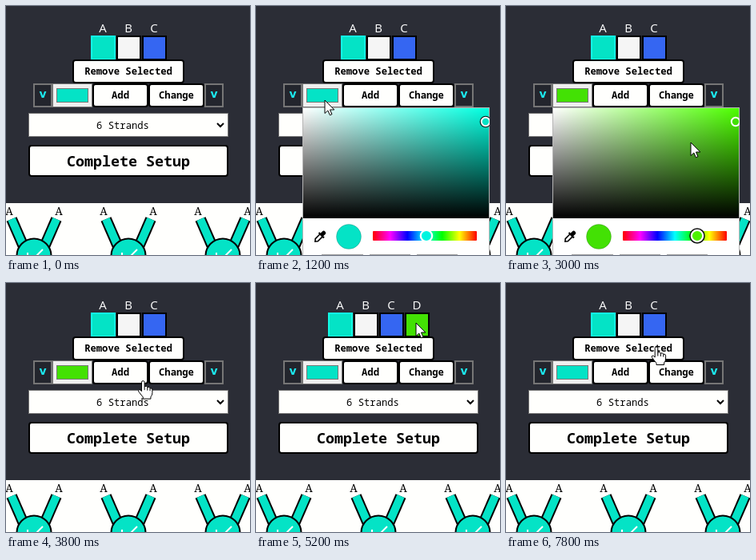
Animation of 305x312 px, one loop 8000 ms. Source, as an HTML page:

```html
<!DOCTYPE html>
<html lang="en">
<head>
<meta charset="utf-8">
<title>Strand colour setup</title>
<style>
html, body { margin: 0; width: 100%; height: 100%; overflow: hidden; background: #2b2d36; }
svg { display: block; width: 100%; height: 100%; }
text { text-anchor: middle; }
.label { font: 15px "Open Sans", "Noto Sans", sans-serif; fill: #fff; }
.mono { font: 600 12.2px "Noto Sans Mono", "DejaVu Sans Mono", monospace; }
.plain { font-weight: 400; }
.big { font-size: 18.35px; }
.vee { font: bold 14px "DejaVu Sans", sans-serif; fill: #1ce8ee; }
.serif { font: 13.5px "Noto Serif", "Liberation Serif", serif; }
.button { fill: #fffffd; stroke: #000; stroke-width: 2; }
.arrow { fill: none; stroke: #fff; stroke-width: 2; }
</style>
</head>
<body>
<svg id="stage" viewBox="0 0 305 312">
  <defs>
    <linearGradient id="white"><stop stop-color="#fff"/><stop offset="1" stop-color="#fff" stop-opacity="0"/></linearGradient>
    <linearGradient id="black" x2="0" y2="1"><stop stop-opacity="0"/><stop offset="1"/></linearGradient>
    <linearGradient id="hues">
      <stop stop-color="#f00"/><stop offset=".1667" stop-color="#f0f"/><stop offset=".3333" stop-color="#00f"/>
      <stop offset=".5" stop-color="#0ff"/><stop offset=".6667" stop-color="#0f0"/>
      <stop offset=".8333" stop-color="#ff0"/><stop offset="1" stop-color="#f00"/>
    </linearGradient>
    <clipPath id="panel"><rect x="58" y="127" width="234" height="186"/></clipPath>
  </defs>
  <rect width="305" height="312" fill="#2b2d36"/>
  <rect y="247" width="305" height="65" fill="#fffffd"/>
  <g id="strands"></g>
  <g id="swatches"></g>
  <g id="controls"></g>
  <rect x="58.5" y="97.5" width="49" height="29" fill="#efefef" stroke="#767676"/>
  <rect id="chosen" x="63.5" y="103.5" width="39" height="17" stroke="#777"/>
  <g id="picker" clip-path="url(#panel)">
    <rect x="58.5" y="127.5" width="233" height="200" fill="#fff" stroke="#b4b4b4"/>
    <rect id="field" x="59" y="128" width="232" height="138"/>
    <rect x="59" y="128" width="232" height="138" fill="url(#white)"/>
    <rect x="59" y="128" width="232" height="138" fill="url(#black)"/>
    <circle id="spotRing" cx="287" cy="145" r="7.3" fill="#101010"/>
    <circle id="spot" cx="287" cy="145" r="5.2" stroke="#fff" stroke-width="2"/>
    <g transform="translate(80 289) rotate(45)" stroke="#000">
      <path d="M-2.2 -2V6L0 8.6L2.2 6V-2" fill="#fff" stroke-width="1.6"/>
      <path d="M-4.5 -2.5H4.5" stroke-width="2.2"/>
      <rect x="-2" y="-8.5" width="4" height="6" rx="1.6" stroke-width="1"/>
    </g>
    <circle id="preview" cx="116" cy="289" r="15.5" stroke="#000" stroke-opacity=".18"/>
    <rect x="146" y="282" width="130" height="12" rx="1" fill="url(#hues)"/>
    <circle id="knobRing" cy="288" r="9.8" fill="#101010"/>
    <circle id="knob" cy="288" r="7.2" stroke="#fff" stroke-width="2.2"/>
    <path d="M82 311.5h52m8 0h51m8 0h51" stroke="#a5a5a5"/>
  </g>
  <g id="cursor" stroke="#000" fill="#fff" stroke-linejoin="round">
    <path id="pointer" d="M0 0V16.5L3.8 13L6.4 18.8L9 17.6L6.5 12H11.8Z"/>
    <path id="hand" d="M-1.8 1.5Q-1.8 0 0 0T1.8 1.5V7Q4.7 5.8 5.4 8Q8 7 8.7 9.2Q11.6 8.6 11.6 11.2V15Q11.6 18 9.6 20V22.5H0V20.4L-5.4 13.6Q-6.6 11.6 -4.8 11Q-3.6 10.8 -1.8 13ZM1.8 7V11.5M5.4 8V12M8.7 9.2V12.5"/>
  </g>
</svg>
<script>
const LOOP = 8000, STEP = 200;
const TEAL = "#04e3c6", GREEN = "#43e104", CYAN = "#12fbe6";
const CLOSE = 3800, ADD = 4200, PICK = 6000, REMOVE = 7600;

// time, x, y of the cursor tip
const path = [
  [400, 158, 236], [800, 96, 132], [1000, 86, 118], [1200, 86, 118],
  [1600, 140, 190], [2200, 237, 288], [2600, 239, 288], [3000, 231, 171],
  [3400, 228, 160], [4000, 143, 104], [4600, 143, 104], [5200, 200, 50],
  [6400, 200, 50], [7200, 188, 80], [8000, 188, 80]
];
// left, top, right, bottom of the areas with a hand cursor
const hot = [[83, 68, 223, 97], [108, 97, 248, 127], [28, 174, 278, 214]];

const $ = id => document.getElementById(id);
const set = (id, attrs) => {
  for (const key in attrs) $(id).setAttribute(key, attrs[key]);
};
const show = (id, on) => set(id, { visibility: on ? "visible" : "hidden" });
const text = (cls, x, y, s) => `<text class="${cls}" x="${x}" y="${y}">${s}</text>`;
const button = (x, y, w, h, s, base, cls = "mono") =>
  `<rect class="button" x="${x + 1}" y="${y + 1}" width="${w - 2}" height="${h - 2}" rx="3"/>` +
  text(cls, x + w / 2, base, s);
const vee = x =>
  `<rect x="${x + 1}" y="98" width="22" height="28" fill="#23252d" stroke="#767676" stroke-width="2"/>` +
  text("vee", x + 12, 115, "v");

function knot(cx) {
  const limb = side => {
    const d = `M${cx + side * 28} 267L${cx + side * 8} 313`;
    return `<path d="${d}" stroke="#000" stroke-width="14"/><path d="${d}" stroke="${TEAL}" stroke-width="10"/>` +
      text("serif", cx + side * 31, 262, "A");
  };
  return limb(-1) + limb(1) +
    `<circle cx="${cx}" cy="313" r="21.5" fill="${TEAL}" stroke="#000" stroke-width="2"/>` +
    `<path class="arrow" d="M${cx + 11} 305L${cx - 8} 324M${cx - 8} 309V324H${cx + 7}"/>`;
}

function swatches(count, selected) {
  const fills = [TEAL, "#f5f5f5", "#3566f2", GREEN];
  const left = 154.5 - count * 16;
  return fills.slice(0, count).map((fill, i) => {
    const x = left + i * 32;
    return `<rect x="${x + .5}" y="38" width="29" height="29" fill="${fill}" stroke="${i === selected ? CYAN : "#000"}" stroke-width="2"/>` +
      text("label", x + 14.5, 33, "ABCD"[i]);
  }).join("");
}

function cursorAt(t) {
  const i = path.findIndex(p => p[0] > t);
  const [t0, x0, y0] = path[i - 1], [t1, x1, y1] = path[i];
  const k = (t - t0) / (t1 - t0);
  return [x0 + (x1 - x0) * k, y0 + (y1 - y0) * k];
}

$("strands").innerHTML = [35, 153, 271].map(knot).join("");
$("controls").innerHTML =
  button(83, 67, 140, 30, "Remove Selected", 86) +
  button(108, 97, 70, 30, "Add", 116) +
  button(178, 97, 70, 30, "Change", 116) +
  vee(34) + vee(248) +
  `<rect x="28.5" y="134.5" width="249" height="29" fill="#fffffd" stroke="#767676"/>` +
  text("mono plain", 146, 154, "6 Strands") +
  `<path d="M264 147l4 4l4 -4" fill="none" stroke="#000" stroke-width="2"/>` +
  button(28, 174, 250, 40, "Complete Setup", 201, "mono big");

let last = -1;
function draw(t) {
  if (t === last) return;
  last = t;
  const open = t >= 1200 && t < CLOSE;
  const hued = t >= 2400;
  const picked = t >= PICK && t < 7800;
  const color = (hued && t <= ADD) || picked ? GREEN : TEAL;
  const knobX = hued ? 239 : 213;

  $("swatches").innerHTML = swatches(t > ADD && t < 7800 ? 4 : 3, picked ? 3 : 0);
  show("strands", t !== ADD && t !== REMOVE);
  set("chosen", { fill: color });

  set("picker", { display: open ? "inline" : "none" });
  set("field", { fill: hued ? "#4dff00" : "#00ffe0" });
  set("spot", { fill: color });
  set("preview", { fill: color });
  set("knob", { fill: hued ? "#4df200" : "#00f5e0", cx: knobX });
  set("knobRing", { cx: knobX });
  show("spotRing", !hued);
  show("knobRing", hued);

  const visible = t >= path[0][0];
  set("cursor", { display: visible ? "inline" : "none" });
  if (!visible) return;
  const [x, y] = cursorAt(t);
  const overButton = hot.some(([l, top, r, b]) => x >= l && x < r && y >= top && y < b);
  const hand = overButton && !(open && y > 127);
  set("cursor", { transform: `translate(${x} ${y})` });
  set("pointer", { display: hand ? "none" : "inline" });
  set("hand", { display: hand ? "inline" : "none" });
}

const start = performance.now();
function tick() {
  const t = (performance.now() - start) % LOOP;
  draw(Math.floor(t / STEP) * STEP);
  requestAnimationFrame(tick);
}
tick();
</script>
</body>
</html>
```
